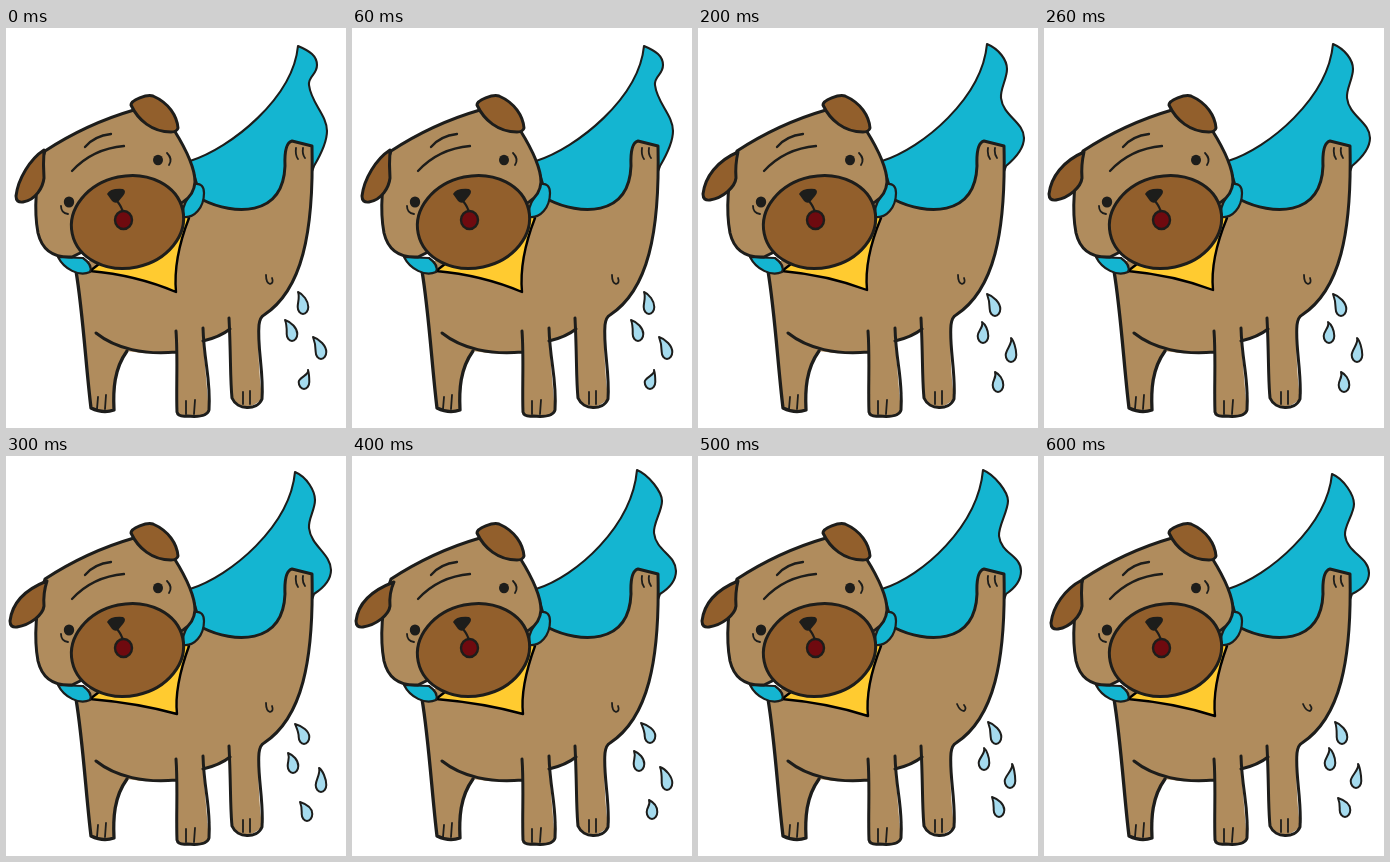
Write an HTML page that moves like this. It is 340x400 px and loops after 0.7 s.

```html
<!DOCTYPE html>
<html lang="en">
<head>
<meta charset="utf-8">
<title>Caped pug</title>
<style>
html, body { margin: 0; width: 100%; height: 100%; overflow: hidden; background: #fff; }
svg { display: block; width: 340px; height: 400px; }
path, ellipse { stroke: #1d1d1b; stroke-width: 3; stroke-linecap: round; stroke-linejoin: round; }
.line { fill: none; }
.thin { fill: none; stroke-width: 1.8; }
.tan { fill: #b08c5d; }
.brown { fill: #925f2c; }
.teal { fill: #14b5d1; }
.gold { fill: #ffcb30; stroke: #000; stroke-width: 2.4; }
.ink { fill: #1d1d1b; stroke: none; }
.drop { fill: #a5dbee; stroke-width: 2; }
</style>
</head>
<body>
<svg viewBox="0 0 340 400">
  <path id="cape" class="teal" style="stroke-width:2.1"/>

  <!-- body and legs -->
  <path class="tan" stroke="none" style="stroke:none" d="M70 243L85 381Q97 386 108 382Q107 343 121 323Q143 327 170 324L171 386Q187 391 203 385L197 313Q213 309 223 302L226 372Q240 386 256 371Q251 330 253 297Q254 289 258 287C296 262 308 205 306 118L285 113Q278 115 279 138C277 190 227 187 195 172L150 180Z"/>
  <path class="line" style="stroke-width:3.3" d="M70 243C77 285 80 340 85 380Q97 386 108 382C107 362 108 341 121 323"/>
  <path class="line" d="M90 305C110 321 139 327 170 324M170 303C172 330 170 360 171 384Q172 389 181 388Q201 390 203 382C205 350 198 335 197 300M197 313Q214 309 224 301"/>
  <path class="line" d="M223 290C225 330 224 350 226 370C231 382 251 383 256 371C258 345 251 319 253 297Q254 289 258 287C296 262 308 205 306 118L286 113Q278 115 279 138C277 190 227 187 197 172"/>
  <path class="thin" d="M92 369L91 381M100 367L99 381M180 373V386M189 372L188 386M237 364V376M244 363V376M290 120Q289 127 292 131M297 120Q296 126 299 130"/>
  <path id="mark" class="thin"/>

  <path id="scarf" class="gold"/>

  <!-- scarf knots -->
  <path class="teal" style="stroke-width:2.2" d="M189 156Q198 155 198 165C198 180 188 190 178 189Q175 180 182 170Z"/>
  <path class="teal" style="stroke-width:2.2" d="M52 229C58 241 73 249 84 244Q87 237 77 230Z"/>

  <!-- head -->
  <path class="tan" d="M39 123C65 106 97 91 128 82L168 102C178 118 189 138 189 154Q188 167 177 174L66 229C48 230 36 222 32 205C28 184 29 149 39 123Z"/>
  <path id="ear" class="brown"/>
  <path class="brown" d="M125 77C125 72 141 66 147 68C163 75 171 88 172 100Q171 104 165 104C146 104 132 92 125 77Z"/>
  <ellipse class="brown" cx="121.5" cy="194" rx="56.5" ry="46" transform="rotate(-12 121.500 194)"/>
  <path class="thin" style="stroke-width:2.3" d="M79 119Q88 108 105 106M66 143C78 130 95 120 118 118"/>
  <ellipse class="ink" style="stroke:none" cx="63" cy="174" rx="5.2" ry="5.6"/>
  <ellipse class="ink" style="stroke:none" cx="152" cy="132" rx="5" ry="5.3"/>
  <path class="thin" d="M55 178Q55 185 62 186M161 125Q167 131 163 137"/>
  <path class="ink" d="M101 166Q104 160 117 161Q121 163 117 168L112 174Q109 176 106 173Z"/>
  <path class="line" style="stroke-width:2.2" d="M111 173Q116 179 117 185"/>
  <ellipse cx="117.500" cy="192" rx="8.500" ry="9" fill="#6f0a0f" style="stroke-width:2.4"/>

  <path class="drop"/><path class="drop"/><path class="drop"/><path class="drop"/>
</svg>
<script>
const STEP = 100;

// cape: tip, upper bulge, notch, lower bulge; drops: tip and centre of each
const poses = [
  { cape: [292, 18, 311, 37, 303, 57, 321, 103], ear: [10, 173, 38, 122], tip: [170, 264],
    drops: [[292, 264, 297, 279], [279, 292, 286, 306], [307, 309, 315, 324], [302, 342, 298, 354]] },
  { cape: [289, 17, 309, 38, 301, 70, 325, 110], ear: [7, 171, 38, 123], tip: [168, 261],
    drops: [[290, 264, 297, 279], [283, 291, 284, 306], [306, 308, 314, 324], [300, 342, 299, 354]] },
  { cape: [289, 16, 309, 41, 303, 70, 326, 110], ear: [5, 171, 40, 124], tip: [169, 262],
    drops: [[289, 266, 297, 281], [284, 294, 285, 308], [313, 310, 313, 327], [297, 344, 300, 357]] },
  { cape: [289, 16, 309, 44, 303, 72, 325, 114], ear: [4, 170, 41, 125], tip: [171, 258],
    drops: [[289, 268, 298, 281], [282, 297, 287, 310], [313, 312, 315, 329], [294, 346, 301, 358]] },
  { cape: [285, 14, 310, 45, 302, 77, 324, 115], ear: [4, 170, 42, 126], tip: [171, 258],
    drops: [[289, 267, 298, 280], [282, 295, 287, 308], [308, 311, 315, 327], [297, 344, 300, 356]] },
  { cape: [285, 14, 310, 45, 301, 80, 323, 115], ear: [4, 170, 40, 125], tip: [170, 260],
    drops: [[290, 266, 298, 281], [286, 292, 286, 307], [314, 308, 312, 325], [294, 341, 301, 354]] },
  { cape: [288, 18, 310, 48, 301, 79, 325, 117], ear: [7, 172, 38, 124], tip: [171, 260],
    drops: [[291, 266, 298, 281], [285, 292, 286, 307], [314, 308, 312, 325], [294, 342, 301, 354]] }
];

const capePath = ([tx, ty, bx, by, nx, ny, lx, ly]) =>
  `M184 133C225 120 ${tx - 5} 70 ${tx} ${ty}C${tx + 12} ${ty + 5} ${bx} ${by - 9} ${bx} ${by}` +
  `C${bx} ${by + 10} ${nx - 1} ${ny - 9} ${nx} ${ny}C${nx + 2} ${ny + 18} ${lx} ${ly - 16} ${lx} ${ly}` +
  `Q${lx} ${ly + 13} 308 138L290 185H200Z`;

const earPath = ([x, y, cx, cy]) =>
  `M${cx} ${cy}C${x + 14} ${cy + 9} ${x + 2} ${y - 22} ${x} ${y - 5}Q${x} ${y + 2} ${x + 7} ${y + 1}` +
  `C${x + 20} ${y - 1} 37 159 38 150Q37 137 ${cx} ${cy}Z`;

const scarfPath = ([x, y]) =>
  `M84 243Q${x - 40} 247 ${x} ${y}Q${x - 3} 231 183 190L178 186L120 215Z`;

const dropPath = ([tx, ty, cx, cy]) => {
  const l = cx - 5.3, r = cx + 5.3;
  return `M${tx} ${ty}C${tx + 2} ${ty + 5} ${l} ${cy - 5} ${l} ${cy}A5.3 7 0 0 0 ${r} ${cy}` +
    `C${r} ${cy - 6} ${(tx + r) / 2} ${ty + 2} ${tx} ${ty}Z`;
};

const marks = ["M260 247Q260 255 264 256Q268 255 266 250", "M259 248Q262 255 266 255Q269 253 266 249"];
const draw = (el, d) => el.setAttribute("d", d);
const part = id => document.getElementById(id);
const [cape, ear, scarf, mark] = ["cape", "ear", "scarf", "mark"].map(part);
const drops = document.querySelectorAll(".drop");
let shown = -1;

function show(i) {
  const pose = poses[i];
  draw(cape, capePath(pose.cape));
  draw(ear, earPath(pose.ear));
  draw(scarf, scarfPath(pose.tip));
  draw(mark, marks[i < 5 ? 0 : 1]);
  drops.forEach((el, k) => draw(el, dropPath(pose.drops[k])));
  shown = i;
}

const start = performance.now();
function tick() {
  const i = Math.floor((performance.now() - start) / STEP) % poses.length;
  if (i !== shown) show(i);
  requestAnimationFrame(tick);
}
tick();
</script>
</body>
</html>
```
